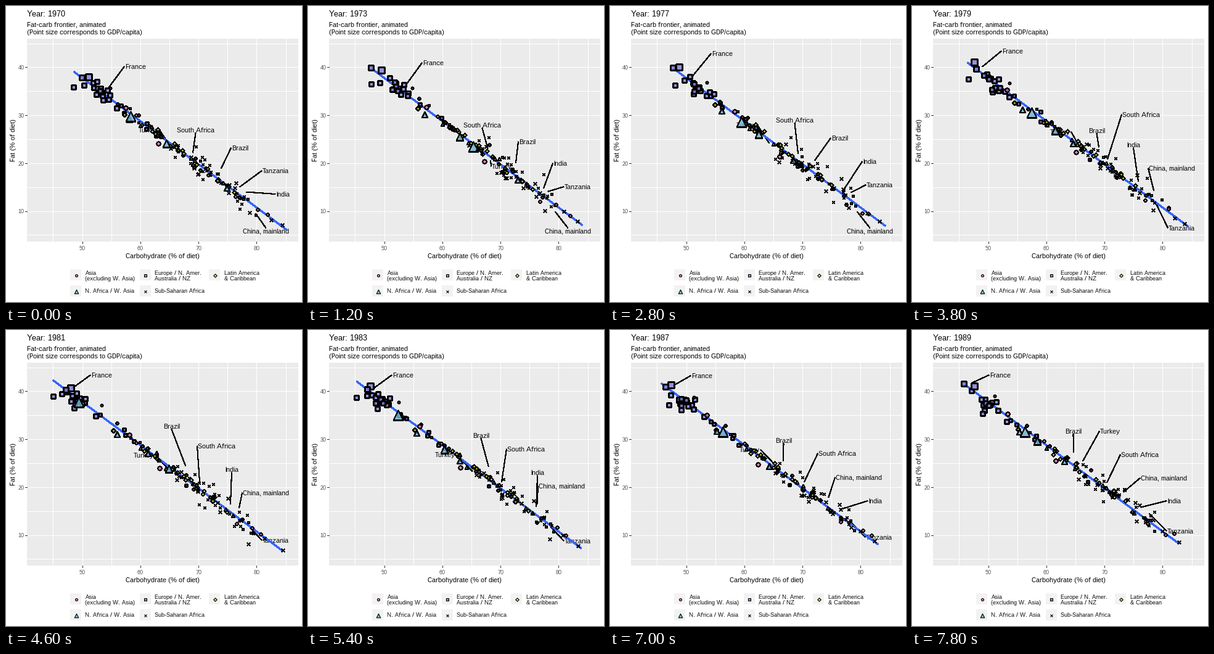
A matplotlib script that plays this animation: 480x480 px, repeating every 8000 ms.

```python
import numpy as np
import matplotlib.pyplot as plt
from matplotlib.animation import FuncAnimation
from matplotlib.patches import Rectangle

plt.rcParams["font.family"] = "Liberation Sans"
plt.rcParams["text.hinting"] = "native"
plt.rcParams["text.hinting_factor"] = 1

PX = 0.72          # points per pixel at 100 dpi
FRAMES = 40
KEYS = np.array([0, 6, 14, 19, 23, 32, 39])
START = np.array([110, 102, 102, 90, 76, 82, 84])
END = np.array([455, 445, 447, 448, 449, 436, 433])
rng = np.random.default_rng(12)

fig = plt.figure(figsize=(4.8, 4.8), dpi=100, facecolor="white")
ax = fig.add_axes([0, 0, 1, 1])
ax.set_xlim(0, 480)
ax.set_ylim(480, 0)
ax.axis("off")


def text(x, y, s, size=11, color="black", **kw):
    kw.setdefault("va", "baseline")
    return ax.text(x, y, s, fontsize=size * PX, color=color, zorder=2, **kw)


def line(xs, ys, color, width=1.0, z=1):
    return ax.plot(xs, ys, color=color, lw=width * PX, zorder=z,
                   antialiased=False, solid_capstyle="butt")[0]


def box(x, y, w, h, color):
    ax.add_patch(Rectangle((x, y), w, h, fc=color, ec="none", zorder=0))


def trend_y(x):
    return 218 + 0.743 * (x - 260)


def locate(i):
    k = int(np.clip(np.searchsorted(KEYS, i, "right") - 1, 0, len(KEYS) - 2))
    return k, (i - KEYS[k]) / (KEYS[k + 1] - KEYS[k])


def at(keyed, i):
    k, t = locate(i)
    return keyed[k] + (keyed[k + 1] - keyed[k]) * t


# Panel, grid and axes
def carb_x(v):
    return 123.5 + (v - 50) * 9.43


def fat_y(v):
    return 332.5 - (v - 10) * 7.77


box(34, 53, 440, 329, "#EBEBEB")
for v in range(45, 90, 5):
    line([carb_x(v)] * 2, [53, 382], "white")
for v in range(5, 50, 5):
    line([34, 474], [fat_y(v)] * 2, "white")
for v in range(50, 90, 10):
    line([carb_x(v)] * 2, [382, 385], "#333333")
    text(carb_x(v), 396, str(v), 9, "#4D4D4D", ha="center")
for v in range(10, 50, 10):
    line([31, 34], [fat_y(v)] * 2, "#333333")
    text(29.5, fat_y(v) + 4, str(v), 9, "#4D4D4D", ha="right")

title = text(34, 17, "", 13)
text(34, 34, "Fat-carb frontier, animated")
text(34, 46, "(Point size corresponds to GDP/capita)")
text(254, 409, "Carbohydrate (% of diet)", ha="center")
text(12, 217, "Fat (% of diet)", rotation=90, ha="center", va="center")
trend = line([], [], "#3366FF", 2.2, 3)


class Group:
    """Countries of one region, scattered around the trend line."""

    def __init__(self, marker, color, z):
        self.marker, self.color, self.z = marker, color, z
        self.scale = PX / 1.41 if marker == "D" else PX
        self.paths, self.sizes = [], []

    def scatter(self, count, lo, hi, shape, spread, size):
        for u in rng.beta(*shape, count):
            x = lo + (hi - lo) * u + rng.normal(0, 5, len(KEYS))
            x = np.clip(x, lo, hi)
            drift = rng.normal(0, spread) * 0.7
            y = trend_y(x) + drift + rng.normal(0, spread, len(KEYS)) * 0.7
            self.paths.append(np.column_stack([x, y]))
            self.sizes.append(size + rng.uniform(-0.6, 0.6))
        return self

    def track(self, size, drop, *xs):
        x = np.array(xs, float)
        self.paths.append(np.column_stack([x, trend_y(x) + drop]))
        self.sizes.append(size)
        return self

    def draw(self, pos, sizes):
        edge = {} if self.marker == "x" else {"edgecolors": "black"}
        pos = np.atleast_2d(pos)
        return ax.scatter(pos[:, 0], pos[:, 1], c=[self.color],
                          s=(np.asarray(sizes) * self.scale) ** 2,
                          marker=self.marker, linewidths=1.1 * PX,
                          antialiased=False, zorder=self.z, **edge)

    def build(self):
        self.keyed = np.stack(self.paths, axis=1)
        self.dots = self.draw(self.keyed[0], self.sizes)

    def move(self, i):
        self.dots.set_offsets(np.floor(at(self.keyed, i)) + 0.5)


europe = Group("s", (0.53, 0.51, 0.84, 0.85), 4)
asia = Group("o", (0.88, 0.42, 0.70, 0.85), 5)
latin = Group("D", (0.84, 0.87, 0.25, 0.9), 6)
north = Group("^", (0.44, 0.70, 0.82, 0.85), 7)
south = Group("x", "black", 8)
GROUPS = [europe, asia, latin, north, south]

europe.scatter(15, START + 12, START + 75, (1.2, 1.4), 7, 7)
europe.scatter(5, START + 75, START + 135, (1, 1), 4, 5.5)
europe.track(10, -9, 133, 118, 111, 100, 104, 97, 100)
europe.track(7, 26, 109, 102, 105, 91, 76, 82, 114)
europe.track(8, 0, 122, 101, 101, 103, 96, 94, 83)
europe.track(4, 10, 304, 314, 303, 287, 291, 295, 284)

asia.scatter(6, 170, 235, (1, 1), 6, 4.2)
asia.scatter(9, 290, 425, (1.4, 1), 8, 4)
asia.track(6.5, 15, 247, 286, 275, 266, 249, 246, 233)
asia.track(6.5, -3, 194, 192, 202, 154, 200, 159, 155)
asia.track(4, -17, 169, 169, 157, 158, 155, 138, 134)

latin.scatter(24, 212, 385, (2, 2), 4, 6)
latin.track(6.5, 9, 192, 178, 170, 166, 174, 173, 172)

north.scatter(9, 218, 368, (1.2, 1.2), 4, 5.5)
north.track(9, 5, 358, 340, 297, 261, 230, 267, 247)
north.track(9, 11, 200, 189, 181, 179, 180, 173, 174)
north.track(12, 5, 260, 246, 241, 232, 264, 169, 203)
north.track(16, 5, 202, 268, 213, 194, 118, 183, 183)

south.scatter(36, 235, 425, (3, 2.4), 12, 4)
south.scatter(2, END - 30, END, (1, 1), 2, 4)

for g in GROUPS:
    g.build()


class Label:
    """Name with a leader; each row holds text x, text y and the leader tip's x."""

    def __init__(self, name, above, below, *rows):
        x, y, tip = np.array(rows, float).T
        gap = np.where(y > trend_y(x), below, above)
        self.tip = np.column_stack([tip, trend_y(tip) + gap])
        self.rest = np.column_stack([x, y]) - self.tip
        self.text = text(0, 0, name, 10.9)
        self.width = self.text.get_window_extent().width
        self.leader = line([], [], "black", 1.1, 2)

    def move(self, i):
        k, t = locate(i)
        a, b = self.rest[k], self.rest[k + 1]
        if np.hypot(*(b - a)) > 50:
            t = round(t)
        dx, dy = a + (b - a) * t
        tx, ty = at(self.tip, i)
        x, y = round(tx + dx), round(ty + dy)
        self.text.set_position((x, y + 4))
        if tx > x + self.width + 10:
            start = x + self.width + 1, y
        elif tx > x + 8.5:
            start = x + self.width / 2, y + 5 * np.sign(ty - y)
        else:
            start = x - 1, y
        self.leader.set_data([start[0], tx], [start[1], ty])


LABELS = [
    Label("France", -11, 0, (193, 98, 164), (186, 92, 157), (165, 77, 134),
          (146, 73, 114), (138, 73, 108), (136, 74, 107), (126, 73, 97)),
    Label("Turkey", -18, 6, (215, 201, 268), (298, 260, 296), (205, 193, 258),
          (224, 204, 276), (207, 203, 268), (205, 200, 265), (305, 164, 277)),
    Label("South Africa", -12, 0, (277, 201, 303), (252, 193, 291), (269, 185, 305),
          (341, 176, 317), (311, 188, 314), (338, 199, 314), (339, 202, 316)),
    Label("Brazil", -21, 0, (366, 230, 349), (342, 220, 337), (359, 214, 332),
          (286, 202, 303), (255, 156, 291), (283, 190, 295), (248, 164, 262)),
    Label("Tanzania", -13, 2, (416, 267, 379), (416, 293, 389), (416, 290, 391),
          (416, 360, 396), (416, 341, 396), (416, 344, 391), (414, 326, 385)),
    Label("India", -13, 0, (438, 305, 390), (398, 255, 382), (410, 252, 381),
          (348, 225, 367), (355, 226, 364), (422, 277, 378), (414, 277, 371)),
    Label("China, mainland", -17, 11, (384, 365, 405), (384, 365, 401), (384, 365, 401),
          (384, 263, 392), (384, 264, 378), (362, 239, 363), (371, 240, 343)),
]


def legend(col, row, group, size, *words):
    x, y = 104 + 112.5 * col, 427 + 26 * row
    box(x, y, 18, 18, "#F2F2F2")
    group.draw((x + 9.5, y + 9.5), [size])
    first = y + 12 - 3 * (len(words) - 1)
    for j, s in enumerate(words):
        text(x + 24.5, first + 9 * j, s, 9.3)


legend(0, 0, asia, 4, "Asia", "(excluding W. Asia)")
legend(1, 0, europe, 4, "Europe / N. Amer.", "Australia / NZ")
legend(2, 0, latin, 5.5, "Latin America", "& Caribbean")
legend(0, 1, north, 6.5, "N. Africa / W. Asia")
legend(1, 1, south, 4, "Sub-Saharan Africa")


def update(i):
    title.set_text(f"Year: {round(1961 + 48 * (18 + i) / 99)}")
    ends = np.array([at(START, i), at(END, i)])
    trend.set_data(ends, trend_y(ends))
    for part in GROUPS + LABELS:
        part.move(i)
    return []


anim = FuncAnimation(fig, update, frames=FRAMES, interval=200,
                     repeat=True, repeat_delay=0, blit=False)
plt.show()
```
